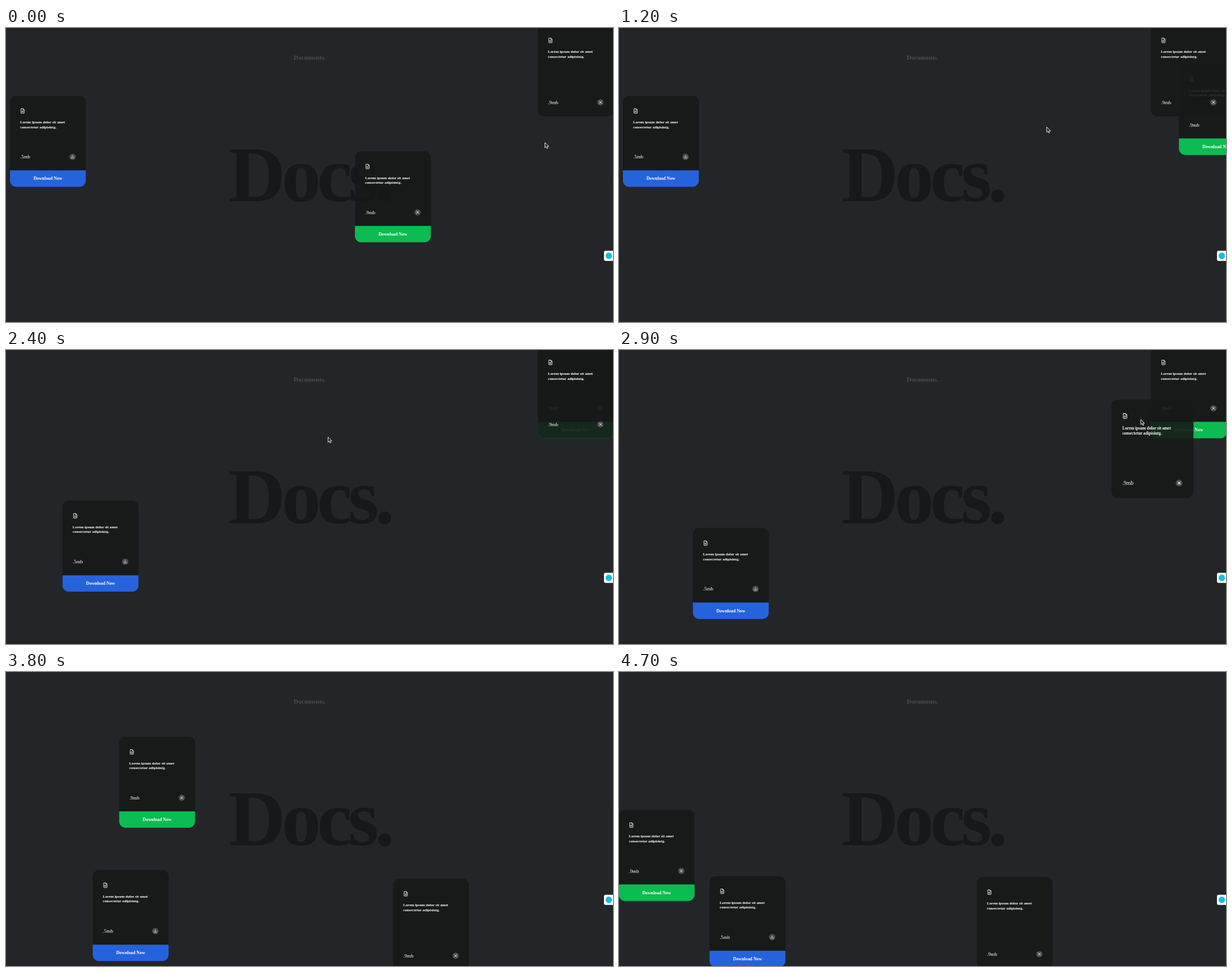
Recreate the animation shown at these times as an HTML page. Size 1075 by 521 pixels, loop 4800 ms.

```html
<!DOCTYPE html>
<html lang="en">
<head>
<meta charset="utf-8">
<title>Draggable documents</title>
<style>
  html, body { margin: 0; width: 100%; height: 100%; overflow: hidden; background: #242529; }
  svg { display: block; width: 100%; height: 100%; }
  text { font-family: "Liberation Serif", "Times New Roman", serif; fill: #fff; }
  .bold { font-weight: 700; }
  .mid { text-anchor: middle; }
  .line { fill: none; stroke: #fff; stroke-linejoin: round; stroke-linecap: round; }
</style>
</head>
<body>
<svg viewBox="0 0 1075 521">
  <text class="bold mid" x="537.7" y="55.7" font-size="11.2" style="fill:#4b4c50">Documents.</text>
  <text class="bold" x="394" y="307.4" font-size="139.75" letter-spacing="-6.99" style="fill:#17181b">Docs.</text>
  <g id="cards"></g>
  <rect x="1059" y="394.7" width="24" height="18" rx="3" fill="#fff"/>
  <circle cx="1067.6" cy="403.8" r="5.7" fill="#12c0dc"/>
  <path id="cursor" d="M0 0V9.2L2.2 7.3 3.7 10.6 5.2 9.9 3.8 6.8H6.8Z" fill="#222326" stroke="#fff" stroke-width=".9" stroke-linejoin="round"/>
</svg>
<script>
const LOOP = 4800, STEP = 100, UNIT = 0.56;
const LEFT = 67.2, RIGHT = 1009, TOP = 75.8, BOTTOM = 444;
const GRIP = 250, LETGO = 200, SLIDE = 0.75;

const CROSS = '<path class="line" stroke-width="1.7" d="M-3.6-3.6 3.6 3.6M3.6-3.6-3.6 3.6"/>';
const ARROW = '<path class="line" stroke-width="1" d="M0-4.5V1.5M-2.5-1 0 1.5 2.5-1M-4.5 1.5V3.5a1 1 0 0 0 1 1h7a1 1 0 0 0 1-1V1.5"/>';

// Cards are drawn around their centre in a 240 x 288 space.
function cardMarkup(size, icon, tag) {
  const row = tag ? 49 : 100;
  const strip = tag ? `
    <path fill="${tag}" d="M-120 92H120V124a20 20 0 0 1-20 20H-100a20 20 0 0 1-20-20Z"/>
    <text class="bold mid" y="122.5" font-size="14">Download Now</text>` : '';
  return `
    <rect x="-120" y="-144" width="240" height="288" rx="20" fill="#171918" fill-opacity=".9"/>
    <path class="line" stroke-width="1.5" transform="translate(-86 -104)"
      d="M2 .75H7.5L11.25 4.5V14a1.25 1.25 0 0 1-1.25 1.25H2A1.25 1.25 0 0 1 .75 14V2A1.25 1.25 0 0 1 2 .75ZM7.5 .75V4.5H11.25M3.4 8.2H8.6M3.4 11.4H8.6"/>
    <text class="bold" x="-88" y="-56.5" font-size="12">Lorem ipsum dolor sit amet</text>
    <text class="bold" x="-88" y="-41.5" font-size="12">consectetur adipisintg.</text>
    <text x="-88" y="${row + 5.4}" font-size="16">${size}</text>
    <g transform="translate(78 ${row})"><circle r="10" fill="#4c4d53"/>${icon}</g>
    ${strip}`;
}

const key = (time, x, y) => ({ time, x, y });

// A drag runs from its first key (grab) to its last (release), then slides on by the throw.
const cards = [
  {
    markup: cardMarkup('.5mb', ARROW, '#2762dd'),
    drags: [{
      path: [key(1865, 74.2, 200.8), key(2000, 128.5, 286.5), key(2040, 128.5, 286.5)],
      throwX: 102, throwY: 160.5
    }]
  },
  {
    markup: cardMarkup('.9mb', CROSS, '#0cbb51'),
    drags: [{
      path: [key(350, 685.2, 299.2), key(700, 490, 367), key(1000, 747, 295)],
      throwX: 2400, throwY: -644
    }, {
      path: [key(3305, RIGHT, TOP), key(3500, 776.5, 120.5), key(3550, 707, 122)],
      throwX: -1550, throwY: 259
    }]
  },
  {
    markup: cardMarkup('.9mb', CROSS),
    drags: [{
      path: [key(2790, RIGHT, TOP), key(2900, 944.7, 175.2), key(2940, 912.4, 201)],
      throwX: -234, throwY: 403
    }]
  }
];

const pointer = [
  key(0, 954.5, 203), key(350, 700, 300), key(700, 505, 368), key(1000, 755, 290),
  key(1200, 757.5, 175.5), key(1900, 82, 204), key(2000, 136.5, 289.5), key(2790, 988, 24),
  key(2900, 924, 123), key(3300, 1000, 65), key(3500, 986.5, 56.7), key(3600, 690, 30.5)
];

function smooth(k) {
  k = Math.min(1, Math.max(0, k));
  return k * k * (3 - 2 * k);
}

function along(path, t) {
  const i = path.findIndex(p => p.time > t);
  if (i === 0) return path[0];
  if (i < 0) return path.at(-1);
  const a = path[i - 1], b = path[i];
  const k = smooth((t - a.time) / (b.time - a.time));
  return { x: a.x + (b.x - a.x) * k, y: a.y + (b.y - a.y) * k };
}

// Exponential slide; past a wall an overdamped spring pulls back.
function glide(from, travel, min, max, sec) {
  const pos = from + travel * (1 - Math.exp(-sec / SLIDE));
  const wall = travel > 0 ? max : min;
  if ((wall - pos) * travel >= 0) return pos;
  const left = 1 - (wall - from) / travel;
  const s = sec + SLIDE * Math.log(left);
  const speed = travel * left / SLIDE;
  return wall + speed / 28.28 * (Math.exp(-5.86 * s) - Math.exp(-34.14 * s));
}

function pose({ drags }, t) {
  const { path, throwX, throwY } = drags.findLast(d => d.path[0].time <= t) || drags[0];
  const grab = path[0], release = path.at(-1);
  const sec = (t - release.time) / 1000;
  const { x, y } = sec <= 0 ? along(path, t) : {
    x: glide(release.x, throwX, LEFT, RIGHT, sec),
    y: glide(release.y, throwY, TOP, BOTTOM, sec)
  };
  const held = smooth((t - grab.time) / GRIP) * (1 - smooth((t - release.time) / LETGO));
  return { x, y, scale: 1 + 0.2 * held };
}

const layer = document.getElementById('cards');
const cursor = document.getElementById('cursor');
layer.innerHTML = cards.map(card => `<g>${card.markup}</g>`).join('');

function draw(t) {
  cards.forEach((card, i) => {
    const { x, y, scale } = pose(card, t);
    layer.children[i].setAttribute('transform', `translate(${x} ${y}) scale(${scale * UNIT})`);
  });
  const tip = along(pointer, t);
  cursor.setAttribute('transform', `translate(${tip.x} ${tip.y})`);
  cursor.setAttribute('visibility', t > pointer.at(-1).time ? 'hidden' : 'visible');
}

const start = performance.now();
function tick() {
  const t = (performance.now() - start) % LOOP;
  draw(Math.floor(t / STEP) * STEP);
  requestAnimationFrame(tick);
}
tick();
</script>
</body>
</html>
```
